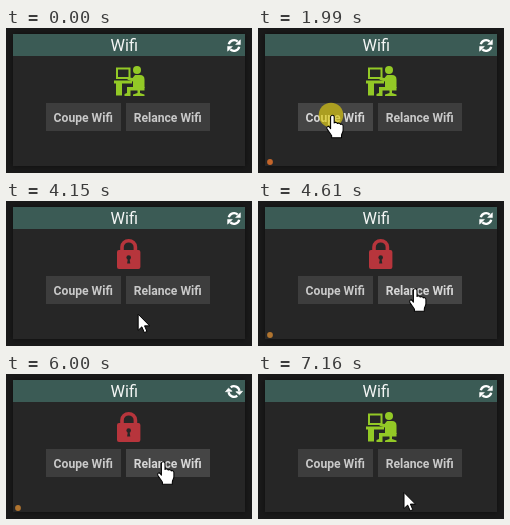
Animation of 246x145 px, one loop 8020 ms. Source, as an HTML page:

```html
<!DOCTYPE html>
<html lang="fr">
<head>
<meta charset="utf-8">
<title>Wifi</title>
<style>
  html, body { margin: 0; width: 100%; height: 100%; overflow: hidden; background: #1a1a1a; }
  svg { display: block; width: 246px; height: 145px; }
  text { font-family: Roboto, sans-serif; text-anchor: middle; }
  .title { font-size: 16.3px; fill: #f4f6f5; }
  .button rect { fill: #3d3d3d; }
  .button text { font-size: 12.15px; font-weight: 700; fill: #c9c9c9; }
  .button.hover rect { fill: #454545; }
  .button.hover text { fill: #d6d6d6; }
  .card { filter: drop-shadow(0 0 3px #0007); }
  .pointer { fill: #fff; stroke: #000; stroke-linejoin: round; }
</style>
</head>
<body>
<svg viewBox="0 0 246 145">
  <defs>
    <g id="half">
      <path d="M56 212A207 207 0 0 1 399 105" fill="none" stroke="#fff" stroke-width="90"/>
      <path d="M502 36V220H318Z" fill="#fff" stroke="#fff" stroke-width="22" stroke-linejoin="round"/>
    </g>
  </defs>

  <rect class="card" x="7" y="6" width="232" height="132" fill="#262626"/>
  <rect x="7" y="6" width="232" height="22" fill="#3b5b55"/>
  <text class="title" x="118.300" y="23">Wifi</text>

  <g id="sync">
    <g transform="translate(228 17.5) scale(.026) translate(-256 -256)">
      <use href="#half"/>
      <use href="#half" transform="rotate(180 256 256)"/>
    </g>
  </g>

  <g id="desk" fill="#93c926">
    <path d="M111 40.500H123.500V50H111Z" fill="none" stroke="#93c926" stroke-width="2"/>
    <path d="M108 52.500H126V55.500H108Z"/>
    <path d="M110 55H116V67.500H110Z"/>
    <circle cx="131" cy="42" r="4"/>
    <path d="M129 47H134Q138.500 47 138.500 51.500V60H127V53.500L121.500 51.800 122 49.300 126.500 50Z"/>
    <path d="M138.500 59V62.500H124.500V68H118.500V66L121 65V59Z"/>
    <path d="M131.500 62H134V65L138.500 66.500V68H127V66.500L131.500 65Z"/>
  </g>

  <g id="lock">
    <path d="M116 50V46a6.700 6.300 0 0 1 13.400 0V50" fill="none" stroke="#b7353c" stroke-width="3.600"/>
    <rect x="111" y="49" width="23.400" height="19" rx="2" fill="#b7353c"/>
    <circle cx="122.700" cy="56.500" r="2.300" fill="#262626"/>
    <path d="M122 57H123.400L124.300 62.500H121.100Z" fill="#262626"/>
  </g>

  <g class="button" id="cut">
    <rect x="40" y="75" width="75" height="28"/>
    <text x="77.200" y="94">Coupe Wifi</text>
  </g>
  <g class="button" id="restart">
    <rect x="120" y="75" width="84" height="28"/>
    <text x="161.700" y="94">Relance Wifi</text>
  </g>

  <circle id="dot" cx="12" cy="134" r="2.900"/>
  <circle id="click" r="12.300" fill="#e1cd0f" fill-opacity=".66"/>
  <g id="cursor" class="pointer">
    <path id="arrow" d="M0 0V16L3.700 12.600 6.200 18.300 8.800 17.200 6.400 11.600H11.500Z"/>
    <path id="hand" transform="scale(1.06)" d="M-1.800 1.500a1.700 1.700 0 0 1 3.400 0V7c1-.9 2.800-.6 3 .6 1-.8 2.600-.4 2.900.8 1-.6 2.500 0 2.500 1.600V14c0 2-1.500 3-1.500 5v2H-.8v-2c-1-2-3.200-4.200-4.400-6.600-.8-1.800 1.400-2.800 2.400-1.400l1 1.400Z"/>
  </g>
</svg>
<script>
const LOOP = 8020;
const ENTER = 450, CLICK_CUT = 1990, LOCKED = 2830, CLICK_RESTART = 4780, UNLOCKED = 7160;
const CLICK_TIME = 150;
const SPIN = 360 / 2000;

const $ = id => document.getElementById(id);
const show = (id, on) => $(id).style.display = on ? '' : 'none';
const within = (v, a, b) => v >= a && v < b;
const point = (x, y) => ({ x, y });

const below = point(141, 144);
const onCutButton = point(74.5, 87.5);
const rest = point(91, 118);
const onRestartButton = point(157.3, 88);
const last = point(146, 118.5);

// Decelerating move along a quadratic curve.
function glide(t, start, end, from, bend, to) {
  const k = Math.min(1, Math.max(0, (t - start) / (end - start)));
  const u = Math.sin(k * Math.PI / 2);
  const mix = axis => (1 - u) ** 2 * from[axis] + 2 * u * (1 - u) * bend[axis] + u * u * to[axis];
  return point(mix('x'), mix('y'));
}

function pointerAt(t) {
  if (t < CLICK_CUT) return glide(t, ENTER, 1830, below, point(91, 140), onCutButton);
  if (t < LOCKED) return glide(t, 2250, 2680, onCutButton, point(82, 102), rest);
  if (t < CLICK_RESTART) return glide(t, 3840, 4610, rest, point(128, 130), onRestartButton);
  return glide(t, 6330, 7010, onRestartButton, point(158, 104), last);
}

function spinAt(t) {
  if (within(t, CLICK_CUT, 2670)) return (t - CLICK_CUT) * SPIN;
  if (within(t, CLICK_RESTART, 7000)) return (t - CLICK_RESTART) * SPIN;
  return 0;
}

function draw(t) {
  const { x, y } = pointerAt(t);
  const visible = t >= ENTER;
  const onRow = visible && within(y, 75, 103);
  const onCut = onRow && within(x, 40, 115);
  const onRestart = onRow && within(x, 120, 204);
  const over = onCut || onRestart;
  const clicked = start => within(t, start, start + CLICK_TIME);

  $('cut').classList.toggle('hover', onCut);
  $('restart').classList.toggle('hover', onRestart);
  show('dot', over);
  $('dot').setAttribute('fill', onCut ? '#c4652a' : '#b0742f');

  show('cursor', visible);
  show('arrow', !over);
  show('hand', over);
  $('cursor').setAttribute('transform', `translate(${x} ${y})`);

  show('click', clicked(CLICK_CUT) || clicked(CLICK_RESTART));
  $('click').setAttribute('transform', `translate(${x - 1.5} ${y - .5})`);

  const locked = within(t, LOCKED, UNLOCKED);
  show('lock', locked);
  show('desk', !locked);
  $('sync').setAttribute('transform', `rotate(${spinAt(t)} 228 17.5)`);
}

const origin = performance.now();
function tick() {
  draw((performance.now() - origin) % LOOP);
  requestAnimationFrame(tick);
}
tick();
</script>
</body>
</html>
```
